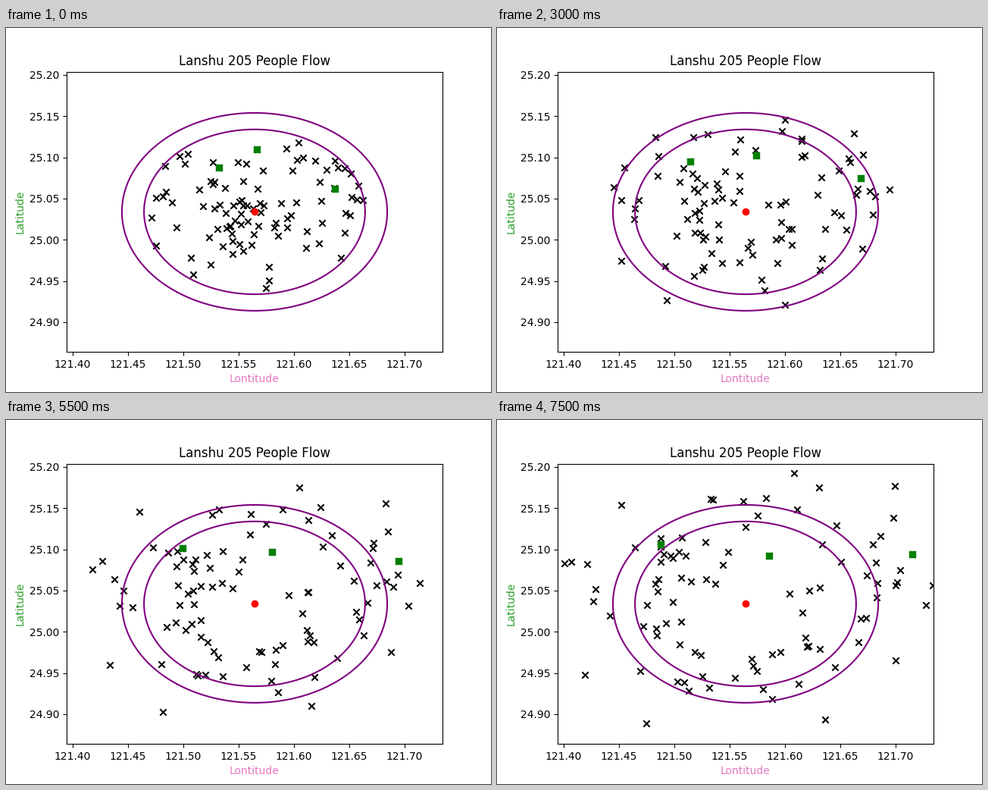
A matplotlib script that plays this animation: 640 by 480 pixels, repeating every 8 s.

```python
import numpy as np
import matplotlib.pyplot as plt
from matplotlib.animation import FuncAnimation

FRAMES, STEP_MS = 16, 500
LON, LAT, SPAN = 121.5645, 25.0339, 0.17
TOWER = np.array([LON, LAT])
CROWD = 88
rng = np.random.default_rng(101)

# Start and end offsets from the tower, in thousandths of a degree
TAGGED = [(-32, 54, -77, 72), (2, 76, 21, 58), (73, 28, 151, 60)]
FARTHEST = [(-89, 17, -164, 49), (-93, -7, -143, 48), (73, 62, 135, 143),
            (29, 77, 44, 159), (10, -93, 72, -140)]


def polar(r, angle):
    return np.column_stack([r * np.cos(angle), r * np.sin(angle)])


def crowd_tracks(count):
    """Walkers scattered round the tower, each heading roughly outwards."""
    angle = rng.uniform(0, 2 * np.pi, count)
    start = polar(0.1 * rng.random(count) ** 0.9, angle)
    heading = angle + rng.normal(0, 0.7, count)
    end = start + polar(rng.uniform(0.03, 0.08, count), heading)
    return np.hstack([start, end])


def walk(tracks, unevenness):
    """Progress along straight lines, shape (frames, walkers, 2)."""
    steps = 1 + unevenness * rng.uniform(-1, 1, (FRAMES, len(tracks)))
    steps[0] = 0
    done = np.cumsum(steps, axis=0)
    done = (done / done[-1])[..., None]
    return TOWER + tracks[:, :2] * (1 - done) + tracks[:, 2:] * done


tagged = walk(np.array(TAGGED) / 1000, 0)
crowd = walk(np.vstack([crowd_tracks(CROWD), np.array(FARTHEST) / 1000]), 0.7)
people = np.concatenate([crowd, tagged], axis=1)

fig, ax = plt.subplots(figsize=(6.4, 4.8), dpi=100)
ax.set_xlim(LON - SPAN, LON + SPAN)
ax.set_ylim(LAT - SPAN, LAT + SPAN)
ax.set_title("Lanshu 205 People Flow")
ax.set_xlabel("Lontitude", color="tab:pink")
ax.set_ylabel("Latitude", color="tab:green")

turn = np.linspace(0, 2 * np.pi, 200)
for r in (0.10, 0.12):
    ax.plot(LON + r * np.cos(turn), LAT + r * np.sin(turn), color="purple")

crosses = ax.scatter(*people[0].T, marker="x", color="black")
squares, = ax.plot(*tagged[0].T, "s", color="green")
ax.plot(LON, LAT, "ro")


def update(i):
    crosses.set_offsets(people[i])
    squares.set_data(*tagged[i].T)
    return crosses, squares


anim = FuncAnimation(fig, update, frames=FRAMES, interval=STEP_MS,
                     repeat=True, repeat_delay=0)
plt.show()
```
